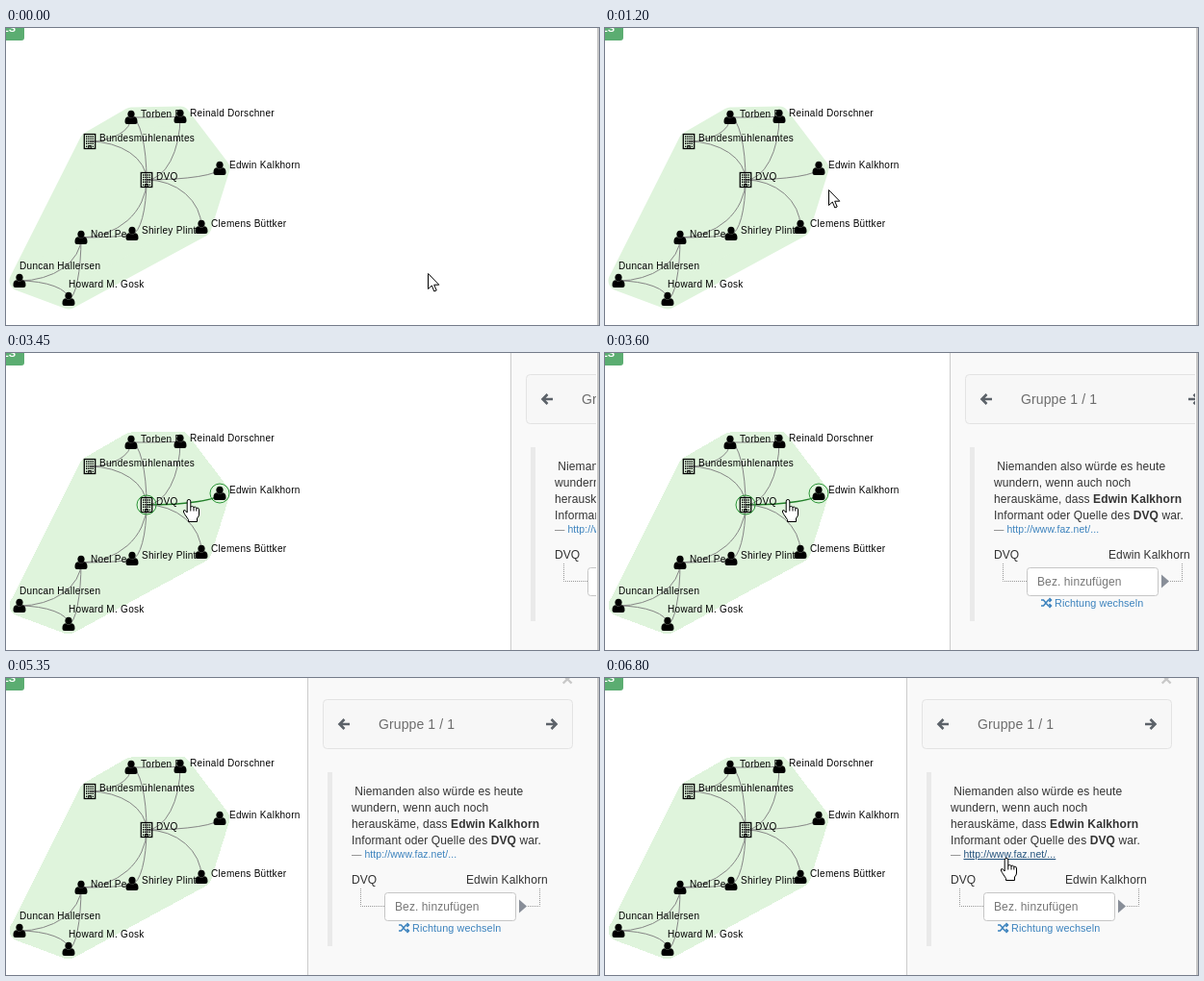
An HTML page for the animation above (8 s loop, 616 by 309 pixels).

```html
<!DOCTYPE html>
<html lang="de">
<head>
<meta charset="utf-8">
<title>Netzwerk</title>
<style>
html, body { margin: 0; width: 100%; height: 100%; overflow: hidden; background: #fff; }
svg { display: block; width: 616px; height: 309px; font: 12px "Liberation Sans", Arial, sans-serif; fill: #333; }
text { white-space: pre; letter-spacing: .1px; }
.label { font-size: 10px; letter-spacing: .3px; fill: #000; }
.link { fill: none; stroke: #858585; }
.link.on { stroke: #23802a; stroke-width: 1.3; }
.ring { fill: none; stroke: #2a9436; }
.cursor { fill: #fff; stroke: #000; stroke-linejoin: round; }
.stroke { fill: none; stroke: #5c6269; stroke-width: 2.6; }
.blue { fill: #3b82bd; }
#url.on { fill: #23527c; text-decoration: underline; }
</style>
</head>
<body>
<svg viewBox="0 0 616 309">
  <defs>
    <g id="person" fill="#000">
      <ellipse cy="-3.4" rx="3.6" ry="3.9"/>
      <path d="M-6.5 4.5C-6.5 1-5.5-.6-3.3-.8C-1.2 1 1.2 1 3.3-.8C5.5-.6 6.5 1 6.5 4.5C6.5 6.2 5.5 7 4.2 7H-4.2C-5.5 7-6.5 6.2-6.5 4.5Z"/>
    </g>
    <g id="office" fill="none" stroke="#000">
      <rect x="-5.7" y="-7.5" width="11.4" height="15" stroke-width="1.3"/>
      <path d="M-4-5H4M-4-2.6H4M-4-.2H4M-4 2.2H4" stroke-width="1.4" stroke-dasharray="1.4 .8"/>
      <path d="M-3.3 4.6V6M3.3 4.6V6M-1.2 7V4.6H1.2V7" stroke-width="1.2"/>
    </g>
  </defs>

  <rect x="-10" y="-10" width="29" height="23" rx="3" fill="#5bad71"/>
  <text x="-4" y="4" font-size="11" font-weight="bold" fill="#fff">LS</text>
  <path id="hull" fill="#dff4dc" stroke="#dff4dc" stroke-width="21" stroke-linejoin="round"/>
  <g id="links"></g>
  <g id="nodes"></g>

  <g id="panel">
    <rect width="303" height="309" fill="#f9f9f9"/>
    <path d="M.5 0V309" stroke="#ccc"/>
    <text x="264" y="8" font-size="21" font-weight="bold" fill="#c8c8c8">×</text>
    <rect x="16.5" y="22.5" width="259" height="51" rx="4" fill="#f7f7f7" stroke="#e3e3e3"/>
    <path class="stroke" d="M44 48H34M38.5 43L33.5 48L38.5 53M248 48H258M253.5 43L258.5 48L253.5 53"/>
    <text x="74" y="53" font-size="14" fill="#6d6d6d">Gruppe 1 / 1</text>
    <rect x="21" y="98" width="5" height="181" fill="#eaeaea"/>
    <text x="49.3" y="122">Niemanden also würde es heute</text>
    <text x="46" y="139">wundern, wenn auch noch</text>
    <text x="46" y="156">herauskäme, dass <tspan font-weight="bold">Edwin Kalkhorn</tspan></text>
    <text x="46" y="173">Informant oder Quelle des <tspan font-weight="bold">DVQ</tspan> war.</text>
    <text x="46" y="187" font-size="10.4" fill="#777">— <tspan id="url" class="blue">http://www.faz.net/...</tspan></text>
    <text x="46" y="214">DVQ</text>
    <text x="165" y="214">Edwin Kalkhorn</text>
    <path d="M55.5 219V237.5H80M241.5 219V237.5H229" fill="none" stroke="#999" stroke-dasharray="1 1"/>
    <rect x="80.5" y="223.5" width="136" height="29" rx="3" fill="#fff" stroke="#c6c6c6"/>
    <text x="91" y="242" fill="#777">Bez. hinzufügen</text>
    <path d="M220 230.5L228 237.5L220 244.5Z" fill="#888e98"/>
    <path d="M95 257H97.5L102.5 263H105M95 263H97.5L102.5 257H105M103.5 255L105.5 257L103.5 259M103.5 261L105.5 263L103.5 265" fill="none" stroke="#3b82bd" stroke-width="1.5"/>
    <text class="blue" x="109" y="264" font-size="10.8">Richtung wechseln</text>
  </g>
  <rect x="613" width="3" height="309" fill="#fff"/>
  <rect x="614" width="2" height="309" fill="#c8c8c8"/>

  <path id="arrow" class="cursor" d="M.5 .5V16.5L4.3 13L6.8 19L9.2 18L6.7 12.2H11.8Z"/>
  <path id="hand" class="cursor" d="M-1.8 14V2Q-1.8 .5 0 .5T1.8 2V8Q3.4 6.8 5 8.4Q6.6 7.6 7.8 9.2Q10.5 8.6 10.5 11V16Q10.5 18 8.5 20V23.5H-.5V21.5L-4.5 15.5Q-6.5 12.5-5.2 11.6Q-3.8 11-1.8 14ZM1.8 8V12.5M5 8.4V12.5M7.8 9.2V12.5"/>
</svg>
<script>
const LOOP = 8000, STEP = 50;
const $ = id => document.getElementById(id);

// Label offsets default to the right of the icon.
const nodes = {
  torben:   { x: 130, y: 93,  label: "Torben F" },
  reinald:  { x: 181, y: 92,  label: "Reinald Dorschner" },
  bureau:   { x: 87,  y: 118, label: "Bundesmühlenamtes", icon: "office" },
  agency:   { x: 146, y: 158, label: "DVQ", icon: "office" },
  edwin:    { x: 222, y: 146, label: "Edwin Kalkhorn" },
  noel:     { x: 78,  y: 218, label: "Noel Pe" },
  shirley:  { x: 131, y: 214, label: "Shirley Plint" },
  clemens:  { x: 203, y: 207, label: "Clemens Büttker" },
  duncan:   { x: 14,  y: 263, label: "Duncan Hallersen", dx: 0, dy: -12 },
  howard:   { x: 65,  y: 282, label: "Howard M. Gosk", dx: 0, dy: -12 }
};

const links = [
  "torben reinald", "bureau torben", "bureau agency", "torben agency",
  "agency reinald", "agency edwin", "agency clemens", "noel agency",
  "shirley agency", "noel shirley", "duncan noel", "duncan howard", "howard noel"
];
const hullOrder = "duncan bureau torben reinald edwin clemens howard";

// Quarter ellipse: leaves the first node horizontally, meets the second vertically.
function linkMarkup(pair) {
  const [a, b] = pair.split(" ").map(key => nodes[key]);
  const dx = b.x - a.x, dy = b.y - a.y;
  const id = pair === "agency edwin" ? ' id="hotLink"' : "";
  const arc = `A${Math.abs(dx)} ${Math.abs(dy)} 0 0 ${dx * dy > 0 ? 1 : 0} ${b.x} ${b.y}`;
  return `<path class="link"${id} d="M${a.x} ${a.y}${arc}"/>`;
}

const labelMarkup = ({ x, y, label, dx = 10, dy = 0 }) =>
  `<text class="label" x="${x + dx}" y="${y + dy}">${label}</text>`;

const iconMarkup = ({ x, y, icon = "person" }) =>
  `<use href="#${icon}" x="${x}" y="${y}"/>`;

const ringMarkup = ({ x, y }) => `<circle class="ring" cx="${x}" cy="${y}" r="10"/>`;

const all = Object.values(nodes);
$("hull").setAttribute("d", "M" + hullOrder.split(" ").map(k => `${nodes[k].x} ${nodes[k].y}`).join("L") + "Z");
$("links").innerHTML = links.map(linkMarkup).join("");
$("nodes").innerHTML = all.map(labelMarkup).join("") + all.map(iconMarkup).join("") +
  `<g id="rings">${ringMarkup(nodes.agency)}${ringMarkup(nodes.edwin)}</g>`;

// Pointer tip: time, x, y
const path = [
  [0, 438, 255], [50, 438, 255], [900, 297, 188], [1200, 232, 168],
  [1750, 196, 154], [1800, 196, 154], [2050, 190, 152], [4350, 190, 152],
  [4400, 194, 152], [4800, 296, 148], [5200, 420, 119], [5600, 420, 119],
  [6250, 418, 180], [6450, 417, 190], [6800, 417, 187], [LOOP, 417, 187]
];

const slope = (i, axis) => path[i] && path[i + 1]
  ? (path[i + 1][axis] - path[i][axis]) / (path[i + 1][0] - path[i][0]) : 0;

function tangent(i, axis) {
  const a = slope(i - 1, axis), b = slope(i, axis);
  return a * b > 0 ? 2 * a * b / (a + b) : 0;
}

// Monotone cubic interpolation
function pointer(t, axis) {
  const i = path.findIndex((p, n) => n + 1 < path.length && t < path[n + 1][0]);
  const p = path[i], q = path[i + 1], span = q[0] - p[0];
  const u = (t - p[0]) / span, v = 1 - u;
  return p[axis] * (1 + 2 * u) * v * v + q[axis] * u * u * (3 - 2 * u) +
    span * u * v * (tangent(i, axis) * v - tangent(i + 1, axis) * u);
}

const show = (el, on) => el.setAttribute("visibility", on ? "visible" : "hidden");
const move = (el, x, y) => el.setAttribute("transform", `translate(${Math.round(x)} ${Math.round(y)})`);

function draw(time) {
  const t = Math.floor(time % LOOP / STEP) * STEP;
  const x = pointer(t, 1), y = pointer(t, 2);

  const linkHot = t >= 1600 && t < 4600;
  $("hotLink").classList.toggle("on", linkHot);
  show($("rings"), linkHot);
  $("hull").setAttribute("shape-rendering", t < 3000 ? "auto" : "crispEdges");

  const slide = Math.min(1, Math.max(0, (t - 3304) / 396));
  move($("panel"), 614 - 301 * (0.5 - Math.cos(Math.PI * slide) / 2), 0);
  show($("panel"), slide > 0);

  const urlHot = t > 5600 && y >= 179;
  $("url").classList.toggle("on", urlHot);

  const hand = urlHot || t >= 1600 && x < 265;
  show($("hand"), hand);
  show($("arrow"), !hand && (t < 1600 || x < 360));
  move($("hand"), x, y);
  move($("arrow"), x, y);
}

function tick() {
  draw(performance.now());
  requestAnimationFrame(tick);
}
tick();
</script>
</body>
</html>
```
